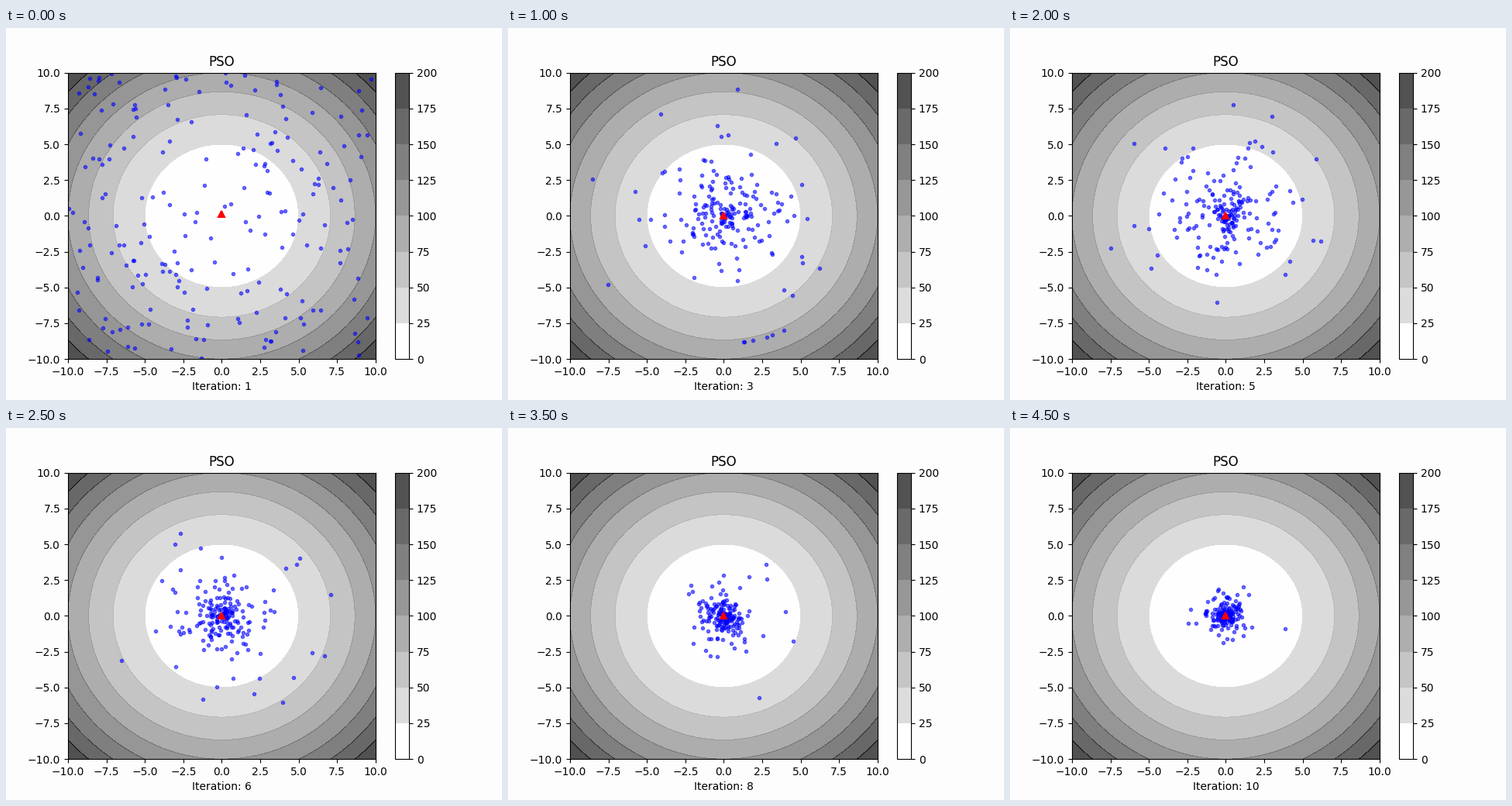
Write a matplotlib script that moves like this. It is 640 px wide and 480 px high and loops after 5000 ms.

```python
import numpy as np
import matplotlib.pyplot as plt
from matplotlib.animation import FuncAnimation

N = 200
STEPS = 10
PAPER = "#fdfdfd"


def swarm(k):
    """Particle positions at step k: spread evenly, then drawn to the middle."""
    rng = np.random.default_rng(40 + k)
    if k < 2:
        pts = rng.uniform(-10, 10, (N, 2))
        # the first pull moves each particle along its line through the optimum
        return pts * rng.uniform(-1, 1, (N, 1)) if k else pts

    scale = 1.8 / (1 + (k / 6.5)**3.5)
    lag = np.where(rng.random(N) < 0.04, 2.5, 1)
    radius = np.minimum(scale * lag * rng.gamma(1.4, size=N), 10 - 0.55 * k)
    angle = rng.uniform(0, 2 * np.pi, N)
    return np.column_stack([radius * np.cos(angle), radius * np.sin(angle)])


fig, ax = plt.subplots(figsize=(6.4, 4.8), dpi=100, facecolor=PAPER)
ax.set_facecolor(PAPER)

axis = np.linspace(-10, 10, 200)
x, y = np.meshgrid(axis, axis)
levels = np.arange(0, 201, 25)
# translucent bands darken where their edges overlap
shades = ["1.0"] + [str(s) for s in np.linspace(0.8, 0, len(levels) - 2)]
bands = ax.contourf(x, y, x**2 + y**2, levels, colors=shades, alpha=0.68)
fig.colorbar(bands, ax=ax, ticks=levels)

ax.set(xlim=(-10, 10), ylim=(-10, 10), title="PSO")
label = ax.set_xlabel("Iteration: 1")
dots, = ax.plot([], [], "b.", markersize=6, alpha=0.55)
best, = ax.plot([], [], "r^", markersize=6, markeredgewidth=1.5)


def draw(k):
    dots.set_data(*swarm(k).T)
    best.set_data([0], [0.12 * 0.3**k])
    label.set_text(f"Iteration: {k + 1}")
    return dots, best, label


anim = FuncAnimation(fig, draw, frames=STEPS, interval=500, repeat=True)
plt.show()
```
